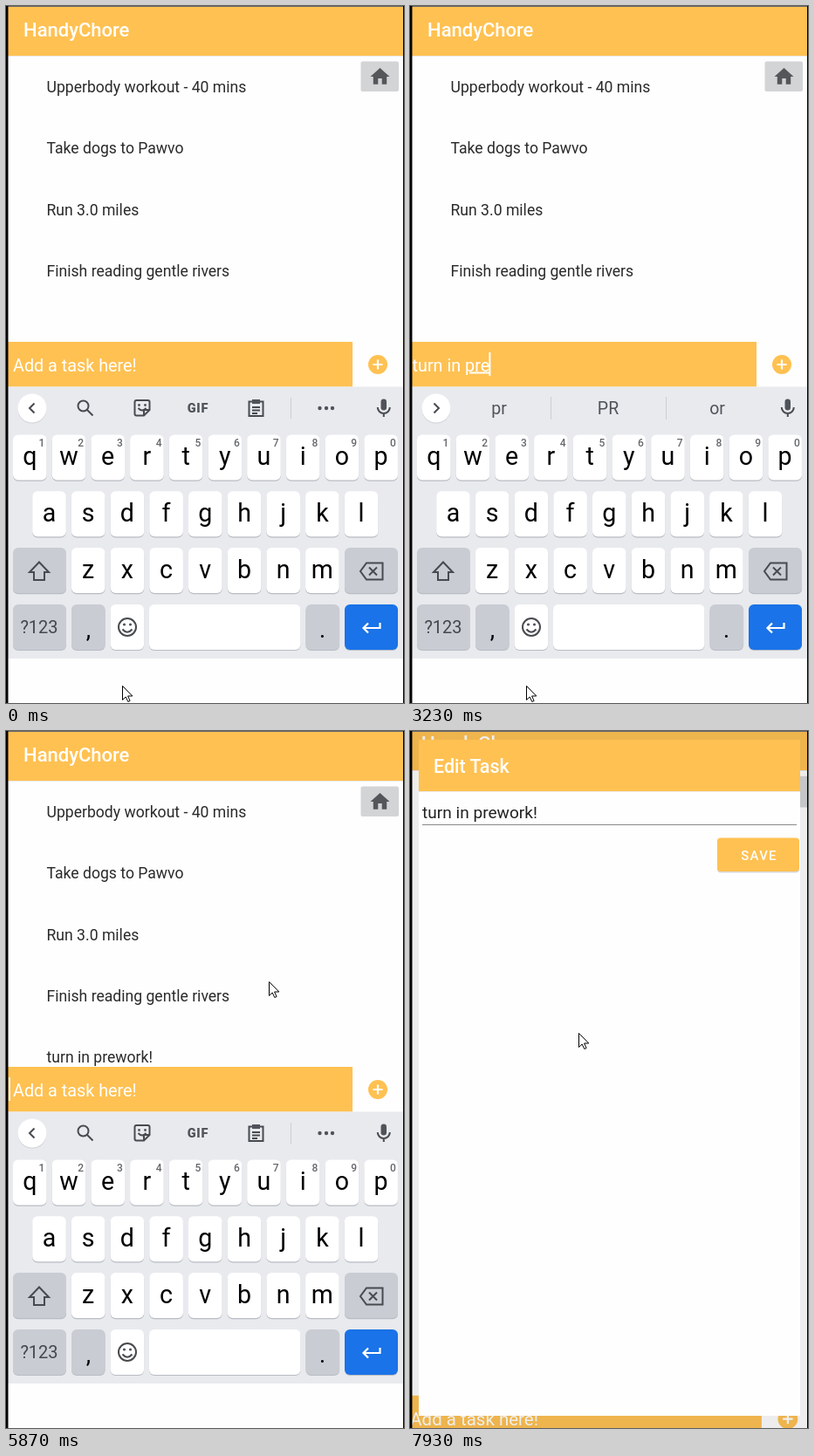
An HTML page for the animation above (8000 ms loop, 456 by 799 pixels).

```html
<!DOCTYPE html>
<html lang="en">
<head>
<meta charset="utf-8">
<title>Task list</title>
<style>
html, body { margin: 0; height: 100%; overflow: hidden; background: #fff; }
svg { display: block; width: 100vw; height: 100vh; font-family: Roboto, sans-serif; }
text { white-space: pre; }
.bold { font-weight: 500; }
.mid { text-anchor: middle; }
.amber { fill: #ffc152; }
.white { fill: #fff; }
.ink { fill: #50545a; }
.line { fill: none; stroke: #474a4f; stroke-width: 2; }
.comp { text-decoration: underline; text-decoration-thickness: 1px; }
</style>
</head>
<body>
<svg viewBox="0 0 456 799">
  <rect width="456" height="799" fill="#fefefe"/>
  <g id="main">
    <rect x="-10" y="57" width="476" height="760" fill="#fefefe"/>
    <g id="list" font-size="17.6" fill="#2a2a2a"></g>
    <rect x="-10" y="-10" width="476" height="67" class="amber"/>
    <rect x="-10" y="57" width="476" height="1" fill="#000" opacity=".08"/>
    <text x="20" y="35" font-size="22" class="bold white">HandyChore</text>
    <rect x="406.500" y="63.500" width="43.500" height="34.500" rx="2" fill="#d3d4d6"/>
    <path d="M10 20v-6h4v6h5v-8h3L12 3 2 12h3v8z" transform="translate(415.300 67.700) scale(1.1)" fill="#55565a"/>
    <g id="bar">
      <rect x="-10" y="385" width="476" height="52" fill="#fefefe"/>
      <rect x="-10" y="385" width="407" height="51.500" class="amber"/>
      <text id="hint" x="8" y="418.500" font-size="19.800" class="white">Add a task here!</text>
      <text id="typed" x="2.500" y="418.500" font-size="19.800" class="white"><tspan id="head"></tspan><tspan id="tail" class="comp"></tspan></text>
      <rect id="caret" y="397" width="2" height="27" class="white"/>
      <circle cx="426" cy="411" r="11" class="amber"/>
      <path d="M426 405.500v11M420.500 411h11" stroke="#fff" stroke-width="2.200"/>
    </g>
  </g>
  <g id="board">
    <rect y="436.500" width="456" height="311.500" fill="#e8eaee"/>
    <circle cx="30" cy="462" r="16.500" fill="#cdd0d5"/>
    <circle cx="30" cy="461" r="16.500" class="white"/>
    <path id="chevron" class="line"/>
    <g id="tools">
      <circle cx="88.500" cy="458.500" r="6" class="line"/>
      <path d="M93 463l6.500 6.500" class="line" stroke-width="2.500"/>
      <path d="M149.500 452h13a2 2 0 0 1 2 2v9l-6.500 6.500h-8.500a2 2 0 0 1-2-2v-13.500a2 2 0 0 1 2-2zM164 463h-6v6M151.500 461q4.500 5 9 0" class="line"/>
      <circle cx="152.500" cy="457.500" r="1.400" class="ink"/>
      <circle cx="159.500" cy="457.500" r="1.400" class="ink"/>
      <text x="220" y="466" font-size="14.500" font-weight="900" letter-spacing=".8" class="mid ink">GIF</text>
      <path d="M278.500 453.500h16v16.500h-16zM282 460h9M282 463.500h9M282 467h6" class="line" stroke-width="1.800"/>
      <path d="M282 451h9v5h-9z" class="ink"/>
      <path d="M326.500 449v24" stroke="#cbced3"/>
      <circle cx="359.500" cy="461" r="2.200" class="ink"/>
      <circle cx="367" cy="461" r="2.200" class="ink"/>
      <circle cx="374" cy="461" r="2.200" class="ink"/>
    </g>
    <g id="words" font-size="19.500" class="mid ink">
      <path d="M161.500 448v26M293.500 448v26" stroke="#cbced3"/>
      <text x="102" y="468"></text><text x="227" y="468"></text><text x="352" y="468"></text>
    </g>
    <rect x="429.500" y="450.500" width="6.500" height="13" rx="3.250" class="ink"/>
    <path d="M425.800 460a7 7 0 0 0 14 0M432.800 467v4" class="line"/>
    <g id="keys"></g>
    <path id="shift" d="M38 637.500L49 649H44V658H32V649H27Z" class="line"/>
    <path d="M413 638.500H431.500V657.500H413L406 648ZM416 643.500l9 9M425 643.500l-9 9" class="line"/>
    <text x="38" y="719" font-size="20" class="mid" fill="#45484d">?123</text>
    <text x="94.500" y="724" font-size="27" class="mid">,</text>
    <text x="362.500" y="724" font-size="27" class="mid">.</text>
    <circle cx="139" cy="712" r="10" class="line"/>
    <path d="M133.500 714.500q5.500 6.500 11 0" class="line"/>
    <circle cx="135.500" cy="709" r="1.600" class="ink"/>
    <circle cx="142.500" cy="709" r="1.600" class="ink"/>
    <path d="M428.500 707V713H410M415 707.500L409.500 713L415 718.500" fill="none" stroke="#fff" stroke-width="2.200"/>
  </g>
  <g id="edit">
    <rect width="456" height="799" opacity=".065"/>
    <rect x="10" y="10" width="437" height="775" fill="#fefefe"/>
    <rect x="10" y="10" width="437" height="59" class="amber"/>
    <rect x="10" y="69" width="437" height="1" opacity=".08"/>
    <text x="27" y="47.500" font-size="21.500" class="bold white">Edit Task</text>
    <text x="14" y="100" font-size="19.100" fill="#222">turn in prework!</text>
    <path d="M14 107.500H443" stroke="#8a8a8a"/>
    <rect x="352" y="124" width="94" height="38.500" rx="4" opacity=".15"/>
    <rect x="352" y="122.500" width="94" height="38.500" rx="4" class="amber"/>
    <text x="400" y="147.500" font-size="14.900" letter-spacing="1.300" class="bold mid white">SAVE</text>
  </g>
  <rect width="456" height="1" fill="#666"/>
  <rect width="2.500" height="799"/>
  <rect x="455" width="1" height="799"/>
  <path id="mouse" d="M0 0V16L3.700 12.500L6.300 18L8.600 17L6.100 11.500H11.300Z" fill="#fff" stroke="#000"/>
</svg>
<script>
const $ = id => document.getElementById(id);
const LOOP = 8000;

function add(parent, tag, attrs, text = '') {
  const el = document.createElementNS('http://www.w3.org/2000/svg', tag);
  for (const k in attrs) el.setAttribute(k, attrs[k]);
  el.textContent = text;
  parent.append(el);
}

// Keyboard
const PITCH = 44.7, rowY = r => 491.5 + r * 64.8;
function key(x, y, w, fill = '#fff') {
  add($('keys'), 'rect', { x, y: y + 1.2, width: w, height: 52, rx: 6, fill: '#b9bcc3' });
  add($('keys'), 'rect', { x, y, width: w, height: 52, rx: 6, fill });
}
['qwertyuiop', 'asdfghjkl', 'zxcvbnm'].forEach((row, r) => {
  [...row].forEach((ch, i) => {
    const x = [27.3, 49.5, 94.2][r] + i * PITCH, y = rowY(r);
    key(x - 19.3, y, 38.6);
    add($('keys'), 'text', { x, y: y + 34.5, 'font-size': 28.6, class: 'mid' }, ch);
    if (!r) add($('keys'), 'text', { x: x + 13.7, y: y + 13.5, 'font-size': 12, class: 'mid bold', fill: '#65686d' }, (i + 1) % 10);
  });
});
const GREY = '#c9ccd3', low = rowY(3);
key(8, rowY(2), 61, GREY);
key(388, rowY(2), 61, GREY);
key(8, low, 61, GREY);
key(75, low, 38.6, GREY);
key(119.5, low, 38.6);
key(164, low, 173.5);
key(343.5, low, 38.6, GREY);
key(388, low, 61, '#1a73e8');

// Task list
const tasks = ['Upperbody workout - 40 mins', 'Take dogs to Pawvo', 'Run 3.0 miles', 'Finish reading gentle rivers', 'turn in prework!'];
tasks.forEach((s, i) => add($('list'), 'text', { x: 46.5, y: 99 + i * 70.3 }, s));

// Each track: [start ms, value...], held until the next entry
const typing = [
  [0, ''], [150, 't'], [410, 'tu'], [810, 'tur'], [1120, 'turn'], [1260, 'turn '],
  [1420, 'turn i'], [1680, 'turn in'], [1950, 'turn in '], [2240, 'turn in p'],
  [2520, 'turn in pr'], [3230, 'turn in pre'], [3510, 'turn in prew'], [3650, 'turn in prewo'],
  [3790, 'turn in prewor'], [3930, 'turn in prework'], [4480, 'turn in prework!'], [5630, '']
];
const suggestions = [
  [0, ''], [280, 'the|to|this'], [410, 'turn|Tue|tu'], [1260, 'in|prework|off'], [1540, 'in|I|is'],
  [1820, 'in|inn|int'], [2090, 'the|my|prework'], [2380, 'p|prework|paper'], [2520, 'pr|PR|or'],
  [3370, 'pre|prework|prep'], [4070, 'prework|rework|prewar'], [4480, '']
];
const caret = [[0, 0], [150, 1], [2940, 0], [3230, 1], [5330, 0], [5630, 1], [6180, 0], [6610, 1], [7070, 0], [7530, 1], [7930, 0]];
const scroll = [[0, 0], [6610, -9.2], [7070, -8]];
const pointer = [
  [0, 133.5, 779.5], [4900, 330.5, 610.5], [5050, 445.5, 445.5], [5190, 431.5, 416.5], [5330, 427.5, 409.5],
  [5750, 360.5, 345.5], [5870, 301.5, 287.5], [6180, 299.5, 291.5], [6610, 296.5, 296.5], [6910, 284.5, 306.5],
  [7070, 254.5, 326.5], [7220, 222.5, 345.5], [7380, 200.5, 355.5], [7530, 190.5, 359.5], [7810, 188.5, 359.5], [7930, 193.5, 346.5]
];
const at = (track, t) => track.findLast(e => e[0] <= t).slice(1);
const show = (id, on) => $(id).style.display = on ? '' : 'none';

function draw(t) {
  const [text] = at(typing, t), [hints] = at(suggestions, t), editing = t >= 7930;
  const [, head, tail] = text.match(/^(.*?)(\w*)$/);
  $('head').textContent = head;
  $('tail').textContent = tail;
  show('hint', !text);
  show('caret', at(caret, t)[0]);
  $('caret').setAttribute('x', text ? 1.7 + $('typed').getComputedTextLength() : 3);

  show('tools', !hints);
  show('words', hints);
  hints.split('|').forEach((w, i) => $('words').children[i + 1].textContent = w);
  $('chevron').setAttribute('d', hints ? 'M27.500 455.500l5.500 5.500l-5.500 5.500' : 'M32.500 455.500l-5.500 5.500l5.500 5.500');
  $('shift').style.fill = t >= 4330 && t < 4630 ? '#474a4f' : 'none';

  $('list').setAttribute('transform', `translate(0 ${at(scroll, t)[0]})`);
  $('list').lastChild.style.display = t >= 5630 ? '' : 'none';
  show('board', !editing);
  show('edit', editing);
  $('main').setAttribute('transform', editing ? 'translate(229 400) scale(1.035) translate(-229 -400)' : '');
  $('bar').setAttribute('transform', editing ? 'translate(0 364.500)' : '');
  $('mouse').setAttribute('transform', `translate(${at(pointer, t)})`);
}

const start = performance.now();
(function frame() {
  draw((performance.now() - start) % LOOP);
  requestAnimationFrame(frame);
})();
</script>
</body>
</html>
```
